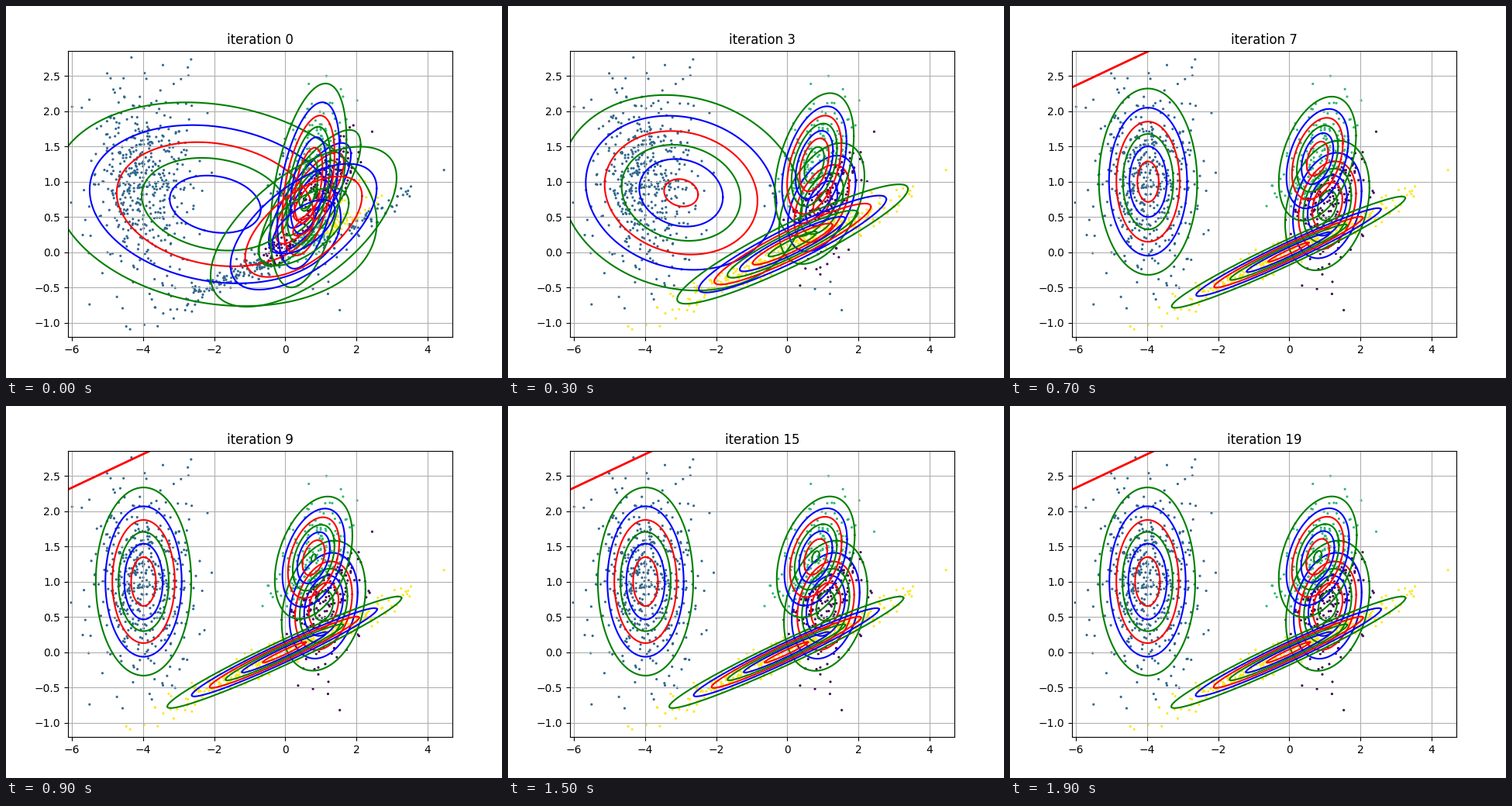
A matplotlib script for the animation above (2000 ms loop, 640 by 480 pixels).

```python
import numpy as np
import matplotlib.pyplot as plt
from matplotlib.animation import FuncAnimation

FRAMES = 20
STEPS = (1, 1.5, 2, 2.5, 3, 4, 5, 6, 8, 10)
LEVEL_COLORS = "rgb"
TINY_LOG = -744.4  # log of the smallest positive double


class Component:
    """A 2D Gaussian that settles from a first guess to its fitted shape.

    Shapes are given as (mean x, mean y, std x, std y, correlation).
    """

    def __init__(self, guess, fit, weights, tau, power):
        self.guess, self.fit = self.canonical(*guess), self.canonical(*fit)
        self.weights = weights
        self.tau, self.power = tau, power

    @staticmethod
    def canonical(mx, my, sx, sy, rho):
        thickness = sy * np.sqrt(1 - rho ** 2)
        return np.array([mx, my, sx ** 2, rho * sx * sy, np.log(thickness)])

    def settle(self, i):
        t = 1 - np.exp(-(i / self.tau) ** self.power)
        mx, my, var, cov, log_thick = self.guess + (self.fit - self.guess) * t
        sx, self.thick = np.sqrt(var), np.exp(log_thick)
        self.mean = np.array([mx, my])
        self.matrix = np.array([[sx, 0], [cov / sx, self.thick]])
        self.log_peak = -np.log(2 * np.pi * sx * self.thick)
        self.weight = self.weights[0] + (self.weights[1] - self.weights[0]) * t

    def sample(self, rng, n):
        self.settle(FRAMES)
        return rng.standard_normal((n, 2)) @ self.matrix.T + self.mean

    def score(self, points):
        z = np.linalg.solve(self.matrix, (points - self.mean).T)
        return np.log(self.weight) + self.log_peak - (z ** 2).sum(axis=0) / 2

    def draw(self):
        top = np.exp(self.log_peak)
        step = level_step(top)
        outline = self.matrix @ CIRCLE
        for k in range(int(top / step) + 1):
            log_level = np.log(k * step) if k else TINY_LOG
            r = np.sqrt(max(0, 2 * (self.log_peak - log_level)))
            ax.plot(*(self.mean[:, None] + r * outline),
                    color=LEVEL_COLORS[k % 3], lw=1.5 if k else 2)


def level_step(top):
    """Smallest round step that cuts the peak into at most eight levels."""
    raw = top / 8
    base = 10 ** np.floor(np.log10(raw))
    return next(s * base for s in STEPS if s * base >= raw * (1 - 1e-9))


def draw(i):
    ax.clear()
    for c in components:
        c.settle(i)
    labels = np.argmax([c.score(points) for c in components], axis=0)
    ax.scatter(*points.T, c=labels, s=5.2, linewidths=0,
               cmap="viridis", vmin=0, vmax=3)
    for c in components:
        c.draw()
    ax.set_xlim(-6.108, 4.697)
    ax.set_ylim(-1.203, 2.861)
    ax.grid(True)
    ax.set_title(f"iteration {i}")


angle = np.linspace(0, 2 * np.pi, 721)
CIRCLE = np.array([np.cos(angle), np.sin(angle)])

purple = Component((0.69, 0.77, 0.715, 0.484, 0.78),
                   (1.08, 0.66, 0.58, 0.456, 0.25), (0.2, 0.15), 2.5, 1.2)
blue = Component((-1.97, 0.682, 2.43, 0.773, -0.18),
                 (-3.985, 1.004, 0.684, 0.681, 0), (0.5, 0.42), 3.5, 2.3)
green = Component((0.65, 0.948, 0.525, 0.71, 0.45),
                  (0.8, 1.355, 0.553, 0.432, 0.36), (0.2, 0.15), 2.3, 0.9)
yellow = Component((0.514, 0.363, 1.372, 0.596, 0.61),
                   (-0.026, 0, 1.709, 0.4109, 0.9717), (0.1, 0.28), 2.8, 1.8)
components = (purple, blue, green, yellow)

rng = np.random.default_rng(4)
points = np.vstack([blue.sample(rng, 500), yellow.sample(rng, 400),
                    green.sample(rng, 190), purple.sample(rng, 190)])

fig, ax = plt.subplots(figsize=(6.4, 4.8), dpi=100)
anim = FuncAnimation(fig, draw, frames=FRAMES, interval=100,
                     repeat=True, repeat_delay=0)
plt.show()
```
